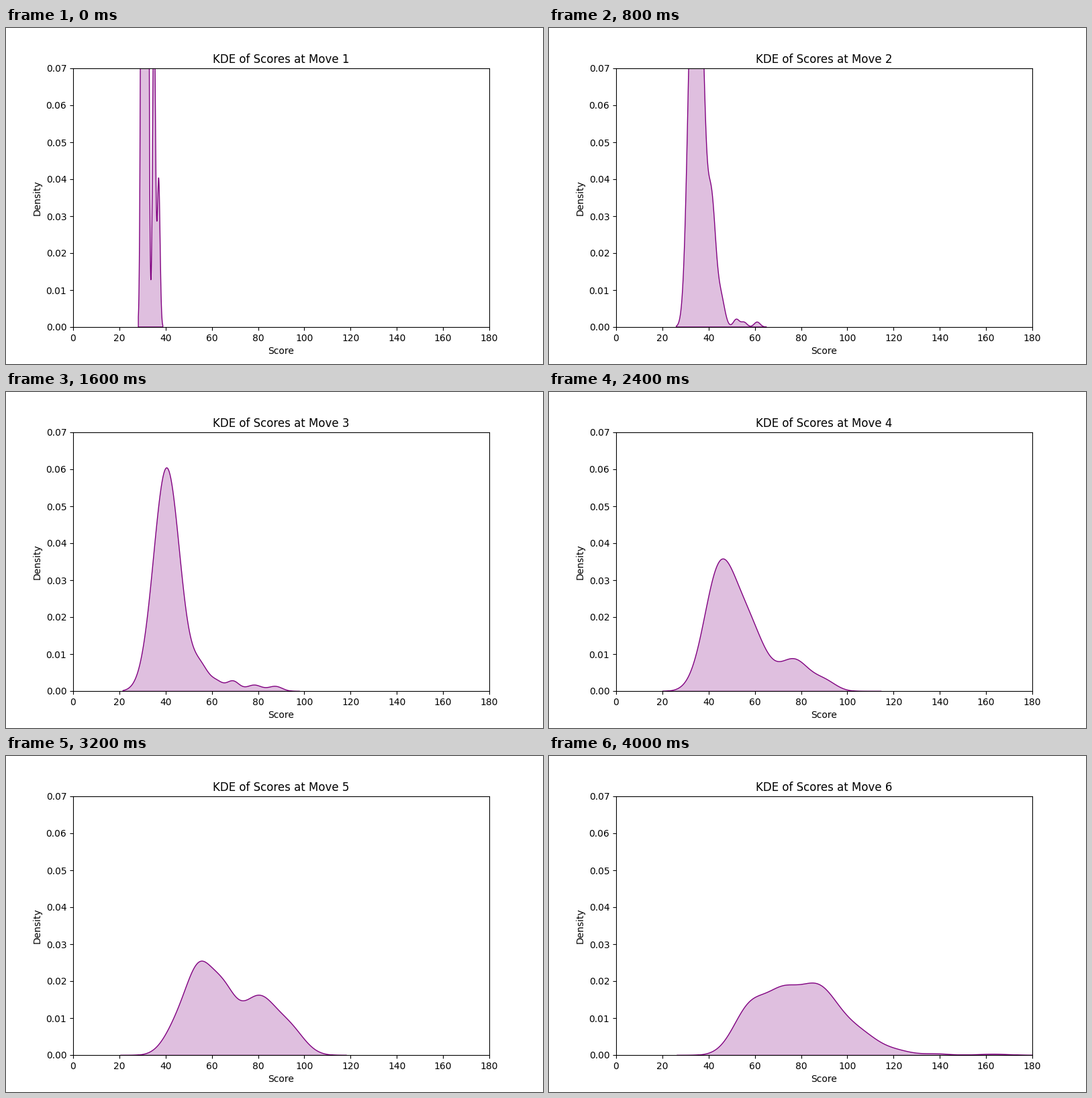
Animation, 800 px wide and 500 px high, one loop 4800 ms. Source, as a matplotlib script:

```python
import numpy as np
import matplotlib.pyplot as plt
from matplotlib.animation import FuncAnimation

# Per move: score range, then bell curves as (centre, height in thousandths, spread)
MOVES = [
    (28.2, 38.8, [(30, 245, 0.6), (31, 60, 0.6), (32, 245, 0.6),
                  (35, 90.5, 0.6), (37, 40, 0.6)]),
    (26, 65, [(33, 95, 2.02), (36.5, 81, 1.84), (41.2, 34.6, 1.89), (45.5, 7, 1.6),
              (52, 2.1, 1.3), (55.3, 1.3, 1.3), (61, 1.36, 1.3)]),
    (21.4, 97.9, [(40.35, 60.5, 5.66), (55, 6.2, 3.8), (62.3, 1.9, 2.5),
                  (68.9, 2.8, 2.8), (78.2, 1.7, 3.2), (87.3, 1.35, 3)]),
    (19.9, 114.6, [(44.2, 29.7, 6.5), (56.3, 18.2, 7.6), (77, 8.3, 6.3), (90, 2.6, 5)]),
    (20.3, 118.2, [(45.4, 7.9, 5.9), (54.5, 20, 5.5), (64.5, 15, 5.5),
                   (80, 15.5, 7.6), (94, 6, 6.3)]),
    (26.1, 190, [(58, 12.9, 7.3), (71.3, 11.9, 6.8), (86.8, 18.1, 9.2),
                 (105.5, 5.2, 8.3), (122, 0.9, 6), (138, 0.42, 6), (163, 0.33, 7)]),
]


def density(x, bells):
    return sum(h / 1000 * np.exp(-0.5 * ((x - c) / s) ** 2) for c, h, s in bells)


plt.rcParams["font.family"] = "DejaVu Sans"
fig, ax = plt.subplots(figsize=(8, 5), dpi=100)


def draw(i):
    low, high, bells = MOVES[i]
    x = np.linspace(low, high, 200)
    ax.clear()
    ax.fill_between(x, density(x, bells), facecolor=("purple", 0.25),
                    edgecolor="purple", linewidth=1)
    ax.set_xlim(0, 180)
    ax.set_ylim(0, 0.07)
    ax.set_xticks(range(0, 181, 20))
    ax.set_yticks(np.arange(8) / 100)
    ax.set_title(f"KDE of Scores at Move {i + 1}")
    ax.set_xlabel("Score")
    ax.set_ylabel("Density")


anim = FuncAnimation(fig, draw, frames=len(MOVES), init_func=lambda: draw(0),
                     interval=800, repeat=True, repeat_delay=0)
plt.show()
```
